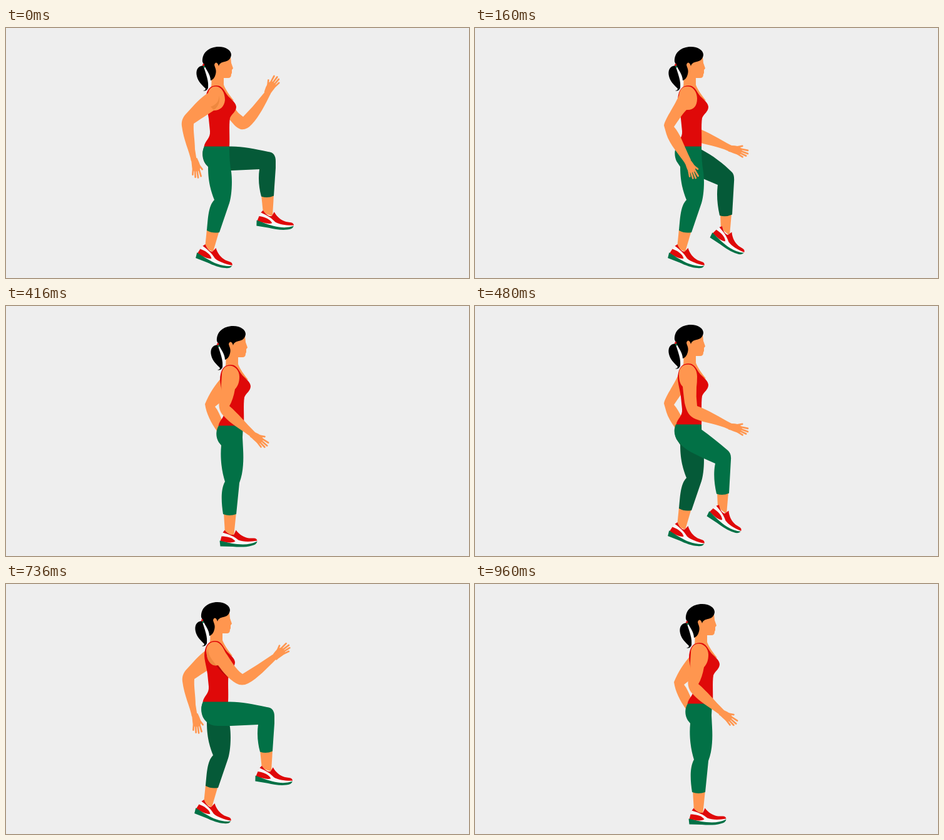
An HTML page that plays this animation: 740x400 px, repeating every 1.12 s.

```html
<!DOCTYPE html>
<html lang="en">
<head>
<meta charset="utf-8">
<title>Marching in place</title>
<style>
  html, body { margin: 0; width: 100%; height: 100%; overflow: hidden; background: #eee; }
  svg { display: block; width: 740px; height: 400px; }
  .skin { fill: #ff964f; }
  .shade { fill: #ee883f; }
  .red { fill: #df0909; }
  .white { fill: #f8f8f8; }
  .near, .sole { fill: #027146; }
  .far { fill: #055a38; }
  .fingers { fill: none; stroke: #ff964f; stroke-width: 2.7; stroke-linecap: round; }
  .pose {
    visibility: hidden;
    animation: show 1120ms step-end infinite;
    animation-delay: calc(var(--i) * 160ms - 1120ms);
  }
  @keyframes show {
    0% { visibility: visible; }
    14.2857%, 100% { visibility: hidden; }
  }
</style>
</head>
<body>
<svg viewBox="0 0 740 400">
  <defs>
    <g id="shoe">
      <path class="white" d="M0-7L4-20L7-25C12-19 18-16 22-18L25-25C30-18 38-13 46-12H54Q58-12 59-7L54-2L36 0Z"/>
      <path class="red" d="M4-21L7-25C12-19 18-16 22-18L25-25C30-18 38-13 46-12H54Q58-12 59-8C48-6 36-6 29-9C22-15 14-18 4-21Z"/>
      <path class="red" d="M0-7L2-15C10-15 20-13 24-7C20-4 10-5 0-7Z"/>
      <path class="sole" d="M-1-8C12-5 24-2 36-2Q49-2 59-7C58-3 55-1 50 0C42 2.500 30 2.500 20 1.500L0 1Z"/>
    </g>

    <g id="hand">
      <path class="skin" d="M-2-5C4-6 9-7 14-6L19-3L18 5L14 7C8 7 4 5-2 5Z"/>
      <path class="fingers" d="M8-4L18-8M14-3L28-3M15 0L29 2M14 3L27 6M11 5L22 9"/>
    </g>

    <g id="head">
      <path class="skin" d="M331 55L359 46L360 56L363 64.500L361 67V70L361 72L360 74Q360 80 355 80L348 80L348 91C351 99 357 107 364 116L340 112L323 104C329 98 329 88 328 80Z"/>
      <path d="M315 60C306 61 303 68 305 77C307 86 314 92 319 97Q319 100 315 100Q320 102 323 96C325 83 321 72 315 60Z"/>
      <path class="white" d="M315 59L320 58C324 68 329 76 328 85Q327 93 323 98C325 86 319 72 315 59Z"/>
      <path d="M314 54C313 39 325 30 340 30C352 30 360 36 360 43C359 50 355 53 349 54C344 55 341 57 340 61C338 54 334 54 333 59C334 64 337 67 335 74Q333 82 327 84C327 74 319 66 314 54Z"/>
      <path class="red" d="M314 58L317 57L317 61L315 62Z"/>
      <path class="sole" d="M315 61L318 60L318 63L316 64Z"/>
    </g>

    <path id="torso" class="red" d="M316.500 190C318 180 327 177 326 165L324 145C322 130 317 118 320 107C322 97 328 92 336 92C342 92 346 95 350 102C356 113 367 117 368 126C368 134 361 137 358 144C356 156 358 175 357 190Z"/>

    <g id="body">
      <use href="#head"/>
      <use href="#torso"/>
    </g>

    <path id="standPants" d="M317 189.500C313 197 314 206 317 213L323 222C323 245 327 260 333 275C323 285 323 305 321 324Q330 329 341 327L356 283C361 270 362 245 360 230Q357 215 357 189.500Z"/>
    <g id="standFoot">
      <path class="skin" d="M321 322L318 352L331 358L341 324Z"/>
      <use href="#shoe" transform="translate(303.500 367) rotate(20)"/>
    </g>

    <path id="highPants" d="M317 189.500C312 200 314 213 321 220Q328 228 340 228H361L405 226C403 240 404 255 408 269.500Q418 273 428 268.500L431 224V213Q431 199 419 198C395 193 377 189 357 189.500Z"/>
    <g id="highFoot">
      <path class="skin" d="M408 267L411 296L426 301L428 267Z"/>
      <use href="#shoe" transform="translate(400.500 315.500) rotate(8)"/>
    </g>
    <g id="midFoot">
      <path class="skin" d="M387 298L388 322L402 333L405 298Z"/>
      <use href="#shoe" transform="translate(371 335.500) rotate(32)"/>
    </g>

    <g id="armBack">
      <path class="skin" d="M323 104C325 96 330 93 336 93.500C344 94 350 103 350 115C349 126 342 132 332 132C321 139 309 147 300 153C299 165 302 180 302 194L305 213L296 213C293 197 284 180 281 157C280 148 283 142 289 136C302 122 310 112 323 104Z"/>
      <use href="#hand" transform="translate(301 211) rotate(74)"/>
    </g>

    <g id="armDown">
      <path class="skin" d="M326 108C327 97 333 93 341 93.500C349 94 355 103 355 113C355 125 349 132 338 131C331 138 325 148 318 158C328 169 333 186 345 211L336 217C325 201 311 186 306 170L302 156C304 145 317 128 326 108Z"/>
      <use href="#hand" transform="translate(340 214) rotate(60)"/>
    </g>

    <g id="armForward">
      <path class="skin" d="M326 109C326 99 332 93.500 341 93.500C350 94 355 103 355 113Q355 122 354 130Q353 145 355 160C372 166 391 178 410 188L406 197.500C386 188 370 188 353 181C342 177 338 168 335 155Q333 140 332 129C327 124 326 117 326 109Z"/>
      <use href="#hand" transform="translate(408 193) rotate(12)"/>
    </g>

    <g id="pose0">
      <path class="skin" d="M365 126C369 135 374 138 379 142L394 126L414 102L423 105C414 123 405 141 393 154Q384 164 375 162C367 159 363 153 357 146Z"/>
      <use href="#hand" transform="translate(418 103) rotate(-62)"/>
      <use href="#highFoot"/>
      <use href="#highPants" class="far"/>
      <use href="#body"/>
      <use href="#standFoot"/>
      <use href="#standPants" class="near"/>
      <use href="#armBack"/>
      <path class="shade" d="M340 107C342 116 336 123 327 126L332 131C340 126 343 116 340 107Z"/>
    </g>

    <g id="pose1">
      <use href="#armForward"/>
      <use href="#midFoot" transform="translate(5 -1)"/>
      <path class="far" d="M356 192L361 194C380 204 397 217 410 230Q415 234 414 246L411 298.500Q401 303 391 300C387 282 386 266 388 251L362 240Z"/>
      <g transform="translate(5)">
        <use href="#body"/>
        <use href="#standFoot"/>
        <use href="#standPants" class="near"/>
      </g>
      <use href="#armDown"/>
    </g>

    <g id="pose2">
      <path class="skin" d="M346 113C334 126 325 140 318 157C320 172 328 187 337 200L348 188L345 182C342 175 339 167 334 161L348 150Z"/>
      <use href="#body" transform="translate(23 2)"/>
      <path class="skin" d="M348 330L350 364L364 369L368 330Z"/>
      <use href="#shoe" transform="translate(342.500 383.500)"/>
      <path class="near" d="M340 191.500C335 199 335 210 340 218L344 223C342 245 345 265 350 281C343 293 344 314 347 333Q357 337 368 333L373 283C379 268 380 248 379 230L378 210L379 191.500Z"/>
      <path class="skin" d="M345 110C345 101 350 95.500 358 95.500C367 96 373 104 373 113C373 123 370 129 366 133Q363 150 357 160C371 172 382 186 398 202L391 209C375 197 358 188 348 176C340 168 339 158 342 148Q345 136 344 126Z"/>
      <use href="#hand" transform="translate(394 206) rotate(33)"/>
    </g>

    <g id="pose3">
      <use href="#armDown"/>
      <g transform="translate(5)">
        <use href="#standFoot"/>
        <use href="#standPants" class="far"/>
        <use href="#body"/>
      </g>
      <use href="#midFoot"/>
      <path class="near" d="M321 189.500C317 198 318 209 325 217C336 232 353 237 366 244L384 252C381 266 382 283 386 300.500Q396 304 406 299.500L409 246Q410 236 404 231C390 219 375 207 361 197V189.500Z"/>
      <use href="#armForward"/>
    </g>

    <g id="pose4" transform="translate(-2 -1)">
      <use href="#armBack" transform="translate(3)"/>
      <use href="#standFoot"/>
      <use href="#standPants" class="far"/>
      <use href="#body"/>
      <use href="#highFoot"/>
      <use href="#highPants" class="near"/>
      <path fill="#b90808" d="M337 130L358 143V151C350 146 343 139 337 130Z"/>
      <path class="skin" d="M322 108C322 98 329 93.500 336 93.500C345 94 349 103 353 111C361 122 369 138 380 145C396 135 412 125 428 114L434 121C419 136 404 152 389 160Q379 165 370 160C358 153 349 142 341 131C328 134 323 120 322 108Z"/>
      <path class="shade" d="M325 104C325 116 332 123 338 131Q332 132 328 127C322 120 322 111 325 104Z"/>
      <use href="#hand" transform="translate(432 118) rotate(-45)"/>
    </g>
  </defs>

  <use class="pose" style="--i:0" href="#pose0"/>
  <use class="pose" style="--i:1" href="#pose1"/>
  <use class="pose" style="--i:2" href="#pose2"/>
  <use class="pose" style="--i:3" href="#pose3"/>
  <use class="pose" style="--i:4" href="#pose4"/>
  <use class="pose" style="--i:5" href="#pose3"/>
  <use class="pose" style="--i:6" href="#pose2"/>
</svg>
</body>
</html>
```
